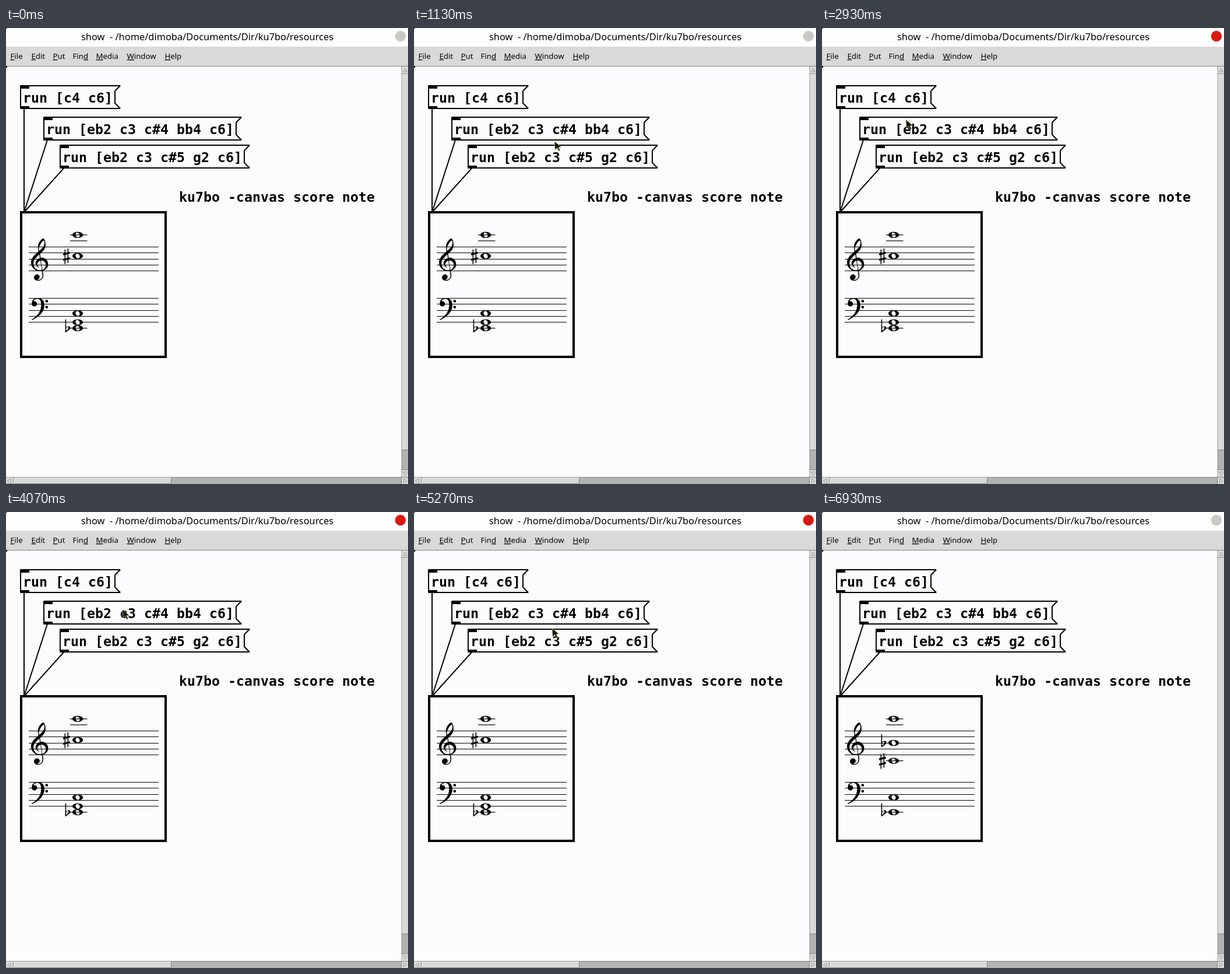
Write an HTML page that moves like this. It is 690 by 782 pixels and loops after 6960 ms.

```html
<!DOCTYPE html>
<html lang="en">
<head>
<meta charset="utf-8">
<title>Score patch</title>
<style>
  html, body { margin: 0; width: 100%; height: 100%; overflow: hidden; background: #fcfcfe; }
  svg { display: block; width: 690px; height: 782px; }
  .title { font: 16.4px "Noto Sans", "Open Sans", sans-serif; }
  .menu { font: 500 13.2px "Noto Sans", "Open Sans", sans-serif; }
  .menu tspan { text-decoration: underline; }
  .mono { font: bold 23.25px "DejaVu Sans Mono", "Noto Sans Mono", monospace; white-space: pre; }
  .line { fill: none; stroke: #000; }
  .bar { fill: #d9d9d9; }
  .trough { fill: #b3b3b3; }
  .hi { fill: none; stroke: #f6f6f6; }
  .lo { fill: none; stroke: #828282; }

  #cursor, #chordA, #chordB, #button { animation: 6960ms infinite; }
  #cursor { animation-name: move, presence; animation-timing-function: ease-in-out, step-end; }
  #chordA { animation-name: chordA; animation-timing-function: step-end; }
  #chordB { animation-name: chordB; animation-timing-function: step-end; }
  #button { animation-name: focus; animation-timing-function: step-end; }

  @keyframes move {
    0%, 5% { transform: translate(420px, 470px); }
    10% { transform: translate(300px, 300px); }
    16.3% { transform: translate(241px, 194px); }
    20.1%, 23% { transform: translate(212px, 171px); }
    30.2% { transform: translate(236px, 202px); }
    33%, 35.2% { transform: translate(225px, 218px); }
    42.1% { transform: translate(144px, 157px); }
    44.5%, 46% { transform: translate(150px, 172px); }
    50.3%, 53.2% { transform: translate(190px, 215px); }
    58.5% { transform: translate(200px, 167px); }
    61%, 63.2% { transform: translate(198px, 172px); }
    68.2%, 70.4% { transform: translate(225px, 215px); }
    75.7% { transform: translate(237px, 199px); }
    80.5%, 83.3% { transform: translate(215px, 170px); }
    90.5% { transform: translate(300px, 150px); }
    94.1%, 100% { transform: translate(560px, 60px); }
  }
  @keyframes presence {
    0%, 94.1%, 100% { opacity: 0; }
    5% { opacity: 1; }
  }
  @keyframes chordA {
    0%, 34.2%, 51.7%, 69.7% { opacity: 1; }
    21.6%, 44.8%, 62.2%, 82.2%, 100% { opacity: 0; }
  }
  @keyframes chordB {
    0%, 34.2%, 51.7%, 69.7% { opacity: 0; }
    21.6%, 44.8%, 62.2%, 82.2%, 100% { opacity: 1; }
  }
  @keyframes focus {
    0%, 94.8%, 100% { fill: #c9cac4; }
    21.6% { fill: #da1812; }
  }
</style>
</head>
<body>
<svg viewBox="0 0 690 782" xmlns="http://www.w3.org/2000/svg">
  <defs>
    <g id="note">
      <ellipse rx="9.2" ry="5.2"/>
      <ellipse rx="3.3" ry="4.2" transform="rotate(-30)" fill="#fcfcfe"/>
    </g>
    <path id="ledger" class="line" stroke-width="1.2" d="M-13 0H16.5"/>
    <g id="sharp" class="line">
      <path stroke-width="1.6" d="M-21.7 -11V14M-16.7 -13V12"/>
      <path stroke-width="3.2" d="M-25 -2.5L-13.4 -5.7M-25 6.7L-13.4 3.5"/>
    </g>
    <g id="flat">
      <path class="line" stroke-width="1.6" d="M-20.6 -15V7"/>
      <path fill-rule="evenodd" d="M-21 0C-17 -5 -11.5 -4 -12.5 0C-13.2 3 -18 5.2 -21 7.5ZM-19.8 0V4.7C-17.5 3 -16 1 -15.9 -.8C-16 -3 -18.6 -2 -19.8 0Z"/>
    </g>
    <path id="arrow" d="M-3.2 2L3.2 2L0 -3.6Z" fill="#e6e6e6" stroke="#828282" stroke-width=".8"/>
  </defs>

  <rect width="690" height="782" fill="#fcfcfe"/>

  <!-- title and menu -->
  <rect width="690" height="32" fill="#fefefe"/>
  <path d="M0 0H2L0 2Z"/>
  <text class="title" x="129" y="21">show&#160; - /home/dimoba/Documents/Dir/ku7bo/resources</text>
  <circle id="button" cx="677" cy="14" r="9.2"/>
  <rect class="bar" y="32" width="690" height="33"/>
  <path class="lo" d="M0 65.5H690"/>
  <rect y="65" width="2" height="3"/>
  <g id="menu" class="menu"></g>

  <!-- scroll bars -->
  <rect class="trough" x="680" y="66" width="10" height="704"/>
  <rect class="bar" x="680" y="66" width="10" height="657"/>
  <rect class="bar" x="680" y="758" width="10" height="12"/>
  <path class="lo" d="M679.5 66V770M680 78.5H690M680 723.5H690M680 757.5H690"/>
  <path class="hi" d="M680.5 67V78M680.5 80V723M680 79.5H690M680.5 759V770"/>
  <use href="#arrow" x="685" y="73"/>
  <use href="#arrow" transform="translate(685 763.5) scale(1 -1)"/>
  <rect class="trough" y="771" width="690" height="11"/>
  <rect class="bar" y="771" width="283" height="11"/>
  <rect class="bar" x="679" y="770" width="11" height="12"/>
  <path class="lo" d="M0 770.5H690M12.5 771V782M283.5 771V782M678.5 771V782M0 781.5H283"/>
  <path class="hi" d="M0 771.5H12M14 771.5H283M13.5 771V782"/>
  <use href="#arrow" transform="translate(6 776.5) rotate(-90)"/>
  <use href="#arrow" transform="translate(684.5 776.5) rotate(90)"/>

  <!-- patch -->
  <path class="line" stroke-width="2" d="M31 138V316M71 192L31 316M99.5 240L31 316"/>
  <g id="boxes"></g>
  <text class="mono" x="297" y="298">ku7bo -canvas score note</text>
  <rect class="line" x="26" y="316" width="248" height="248" stroke-width="4"/>

  <!-- clefs -->
  <g transform="translate(43.2 361.3) scale(1.9 1.76)">
    <path stroke="#000" stroke-width=".4" d="M8.4 18.8C10 18.5 11.5 18.8 12.7 19.7C14 20.6 14.7 22 15 23.5C15.8 26.3 14.1 29.6 11.4 30.6L10.2 31L10.7 34.4C10.9 36.5 10.7 38.8 8.8 40C7.2 41 4.8 41.2 3.4 39.7C2 38.2 2.9 35 5.1 35C6.9 34.7 8.1 36.9 7.3 38.4C7 38.9 6.1 39.6 5 39.9C6.9 41 9.2 39.9 9.9 38.2C10.8 36 10 33.7 9.8 31.3C8.5 31.6 7.2 31.5 6 31.2C2.7 30.4 .3 27.3 .1 24C-.3 20.5 1.8 17.4 4.1 15L6.8 12.3C6.2 9.4 5.9 6.2 7.4 3.5C8.3 2.2 9.5 .2 11.2 0C12.6 1.8 12.9 4.3 12.8 6.5C12.7 10 10.1 12.7 7.8 15Z"/>
    <path fill="#fcfcfe" d="M12 3.5C12.3 6.6 10 9.2 8 11.2L7.3 11.8C7.2 11.3 7 10.1 7 9.7C7.2 7 9.4 3.1 11.3 1.7Q11.8 2.3 12 3.5ZM13.3 25.4C13.5 27.4 12.2 29.7 10.2 30.4L8.8 21.4C11 21.2 13 22.4 13.3 25.4ZM8.1 30.6C5.6 30.8 3.1 29 2.5 26.5C1.7 24.4 2 21.9 3.3 20C4.4 18.3 5.9 16.9 7.3 15.5L7.9 18.9C4.9 19.7 2.9 23.6 4.6 26.3C5.2 27.1 6.6 28.5 7.4 27.9C6.3 27.3 5.4 26.1 5.6 24.7C5.5 23.4 7 21.8 8.3 21.5L9.7 30.4Z"/>
  </g>
  <path d="M44.5 473C43.5 466 49 463 55 463C62 463 66 468 66 475C66 487 56 496 44.5 501L44 500C54 494 60.3 486 60.3 475C60.3 468 58 464.6 54 464.6C50 464.6 47 467 47 470Z"/>
  <circle cx="48.8" cy="473" r="4.5"/>
  <circle cx="69.8" cy="468.4" r="2.3"/>
  <circle cx="69.8" cy="478.8" r="2.3"/>
  <path id="staves" class="line" stroke-width="1" shape-rendering="crispEdges"/>

  <g id="held"></g>
  <g id="chordA"></g>
  <g id="chordB"></g>

  <g id="cursor">
    <path d="M0 0L11.5 10.2L7.2 10.8L9.8 16L7.4 17L4.8 11.8L1 14.8Z" fill="#15150c" stroke="#c9c79a" stroke-width=".8"/>
  </g>
</svg>
<script>
  const $ = id => document.getElementById(id);

  const menu = [["File", 7], ["Edit", 43], ["Put", 80], ["Find", 114, 3],
                ["Media", 154], ["Window", 207], ["Help", 272]];
  $("menu").innerHTML = menu.map(([word, x, key = 0]) =>
    `<text x="${x + 0.5}" y="53">${word.slice(0, key)}<tspan>${word[key]}</tspan>${word.slice(key + 1)}</text>`
  ).join("");

  const message = (x, y, text) => {
    const right = x + 17 + text.length * 14;
    return `<path class="line" stroke-width="2" stroke-linejoin="bevel" d="M${x} ${y}H${right}l-9 9v21l9 9H${x}Z"/>
      <path d="M${x - 1} ${y}h16v5h-16zM${x - 1} ${y + 35}h16v4h-16z"/>
      <text class="mono" x="${x + 4}" y="${y + 29}">${text}</text>`;
  };
  $("boxes").innerHTML = message(25, 99, "run [c4 c6]")
    + message(65, 153, "run [eb2 c3 c#4 bb4 c6]")
    + message(93, 201, "run [eb2 c3 c#5 g2 c6]");

  let staves = "";
  for (const top of [375.5, 463.5])
    for (let i = 0; i < 5; i++) staves += `M39 ${top + i * 10.25}H262`;
  $("staves").setAttribute("d", staves);

  const put = (y, ...parts) =>
    ["note", ...parts].map(id => `<use href="#${id}" x="123" y="${y}"/>`).join("");
  $("held").innerHTML = put(354.8, "ledger") + '<use href="#ledger" x="123" y="365"/>'
    + put(489.5) + put(514.8, "ledger", "flat");
  $("chordA").innerHTML = put(391, "sharp") + put(504.6);
  $("chordB").innerHTML = put(396, "flat") + put(426.6, "ledger", "sharp");
</script>
</body>
</html>
```
